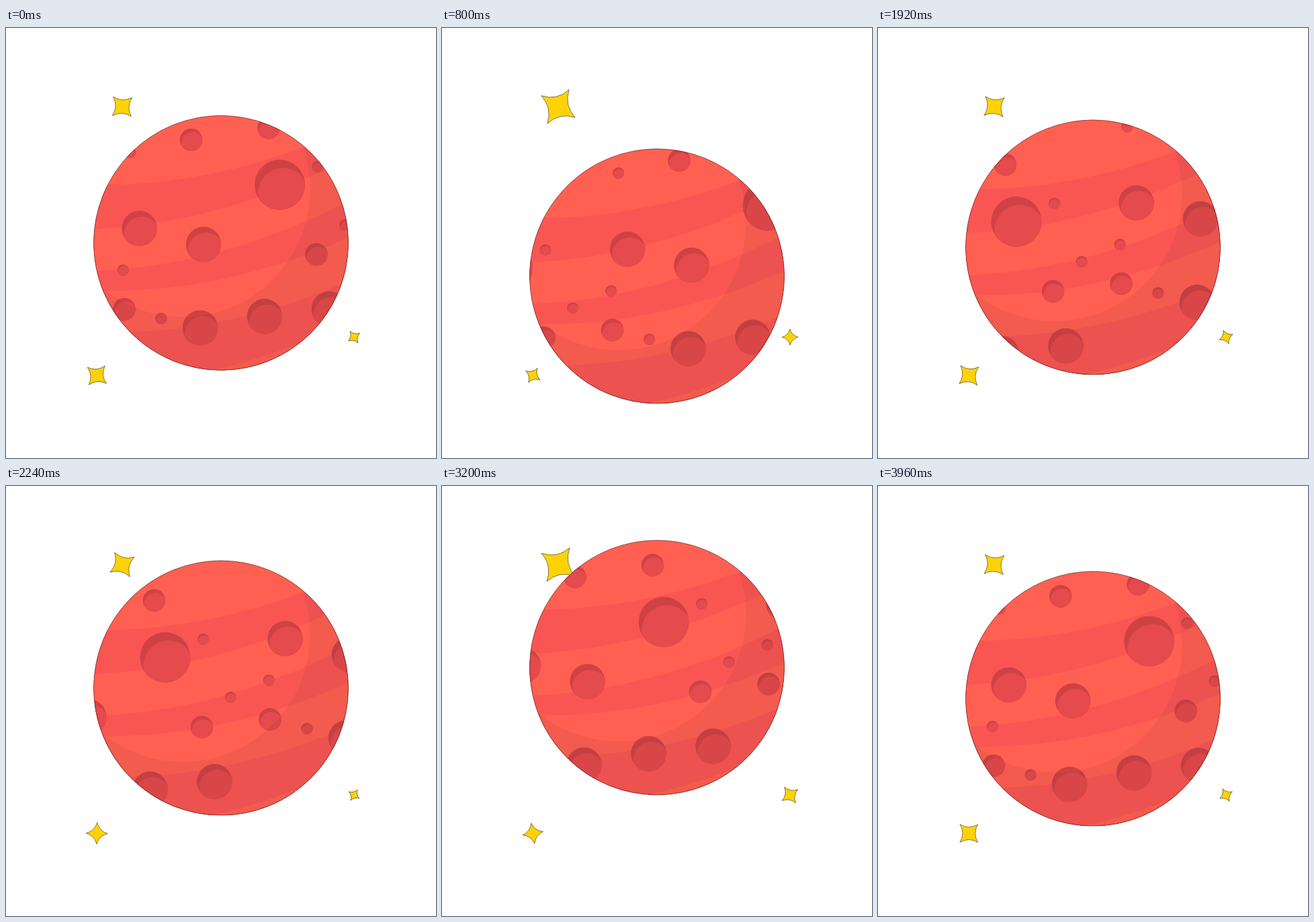
Recreate the animation shown at these times as an HTML page. Size 640 by 640 pixels, loop 4 s.

```html
<!DOCTYPE html>
<html lang="en">
<head>
<meta charset="utf-8">
<title>Red planet</title>
<style>
  html, body { margin: 0; width: 100%; height: 100%; overflow: hidden; background: #fff; }
  svg { display: block; width: 100vw; height: 100vh; }
  .edge { stroke: #2a1208; stroke-opacity: .65; stroke-width: .8; }
  .star { fill: #ffd205; }
</style>
</head>
<body>
<svg viewBox="0 0 640 640">
  <defs>
    <clipPath id="disc"><circle cx="320" cy="319.5" r="189.5"/></clipPath>
    <g id="crater">
      <circle r="1" fill="#cf4244"/>
      <path d="M.98 -.196A1 1 0 0 1 -.85 .526A1 1 0 0 1 .98 -.196Z" fill="#e54a4c"/>
    </g>
  </defs>
  <g id="stars"></g>
  <g id="planet">
    <g clip-path="url(#disc)">
      <circle cx="320" cy="319.5" r="190" fill="#ff6052"/>
      <g id="bands"></g>
      <g id="craters"></g>
      <path d="M120 120H520V520H120ZM73.5 240a189.5 189.5 0 0 1 379 0a189.5 189.5 0 0 1 -379 0Z"
            fill-rule="evenodd" opacity=".05"/>
    </g>
    <circle class="edge" cx="320" cy="319.5" r="189.5" fill="none"/>
  </g>
</svg>
<script>
const LOOP = 4000, STEP = 40;
const RADIUS = 189.5, CENTER = 320;
const DRIFT = { x: 387.5, y: -93 };   // surface travel in one loop

const byId = id => document.getElementById(id);

function add(parent, tag, attrs) {
  const el = document.createElementNS("http://www.w3.org/2000/svg", tag);
  for (const name in attrs) el.setAttribute(name, attrs[name]);
  return byId(parent).appendChild(el);
}

// Parabolic edge: y = height - slope*s - BEND*s*s, filled downwards,
// with s running from -1 to 1 across the planet.
const BEND = 22.6, REACH = 1.1;
function addEdge(height, slope, fill) {
  const dx = REACH * RADIUS, sag = BEND * REACH ** 2, rise = slope * REACH;
  add("bands", "path", {
    fill,
    d: `M${CENTER - dx} ${height + rise - sag}Q${CENTER} ${height + sag} ` +
       `${CENTER + dx} ${height - rise - sag}V560H${CENTER - dx}Z`
  });
}

function addBand(top, topSlope, bottom, bottomSlope) {
  addEdge(top, topSlope, "#f95653");
  addEdge(bottom, bottomSlope, "#ff6052");
}

addBand(213.5, 42, 269, 52.5);
addBand(332, 51.7, 373.8, 39.5);
addBand(436.8, 37.7, 505.7, 45.5);

// A row of equal craters, repeated on each tile of the moving surface.
function addRow(r, x, y, count = 1, dx = 0, dy = 0, bend = 0) {
  for (let i = 0; i < count; i++) {
    for (const tile of [-1, 0, 1]) {
      const cx = x + dx * i + DRIFT.x * tile;
      const cy = y + dy * i + bend * i * i + DRIFT.y * tile;
      add("craters", "use", { href: "#crater", transform: `translate(${cx} ${cy}) scale(${r})` });
    }
  }
}

const SMALL = 8.6, MEDIUM = 16.8, LARGE = 26.3, HUGE = 37.5;
addRow(HUGE, 407.5, 233);
addRow(LARGE, 198.5, 298, 2, 95.5, 23.8);
addRow(LARGE, 289, 446, 3, 96, -20, 3);
addRow(MEDIUM, 275.5, 166, 2, 115.5, -17.7);
addRow(MEDIUM, 74.5, 429.7, 2, 101.5, -11.4);
addRow(SMALL, 117.2, 385.5, 2, 57, -25.5);
addRow(SMALL, 464, 206);
addRow(SMALL, 231, 432);
addRow(SMALL, 185, 184.7);

// Size and turn swing together, largest at time "peak", every 2 s.
const stars = [
  { x: 173, y: 117, size: 25.5, swing: 42, peak: 1010 },
  { x: 135.3, y: 517, size: 16, swing: 58, peak: 1750 },
  { x: 518, y: 460, size: 11.9, swing: 58, peak: 1300 }
];
for (const star of stars) star.el = add("stars", "path", { class: "star edge" });

function starPath(r) {
  const c = 0.21 * r;
  return `M0 ${-r}Q${c} ${-c} ${r} 0Q${c} ${c} 0 ${r}Q${-c} ${c} ${-r} 0Q${-c} ${-c} 0 ${-r}Z`;
}

function draw(ms) {
  const t = Math.floor((ms % LOOP) / STEP) * STEP;
  const p = t / LOOP;
  const bob = 0.3 + 52.1 * Math.sin(2 * Math.PI * p);
  byId("planet").setAttribute("transform", `translate(0 ${bob})`);
  byId("craters").setAttribute("transform", `translate(${DRIFT.x * p} ${DRIFT.y * p})`);
  for (const { el, x, y, size, swing, peak } of stars) {
    const wave = Math.cos(Math.PI * (t - peak) / 1000);
    el.setAttribute("d", starPath(size * (1 + 0.22 * wave)));
    el.setAttribute("transform", `translate(${x} ${y}) rotate(${89.5 + swing * wave})`);
  }
}

const start = performance.now();
function tick() {
  draw(performance.now() - start);
  requestAnimationFrame(tick);
}
tick();
</script>
</body>
</html>
```
